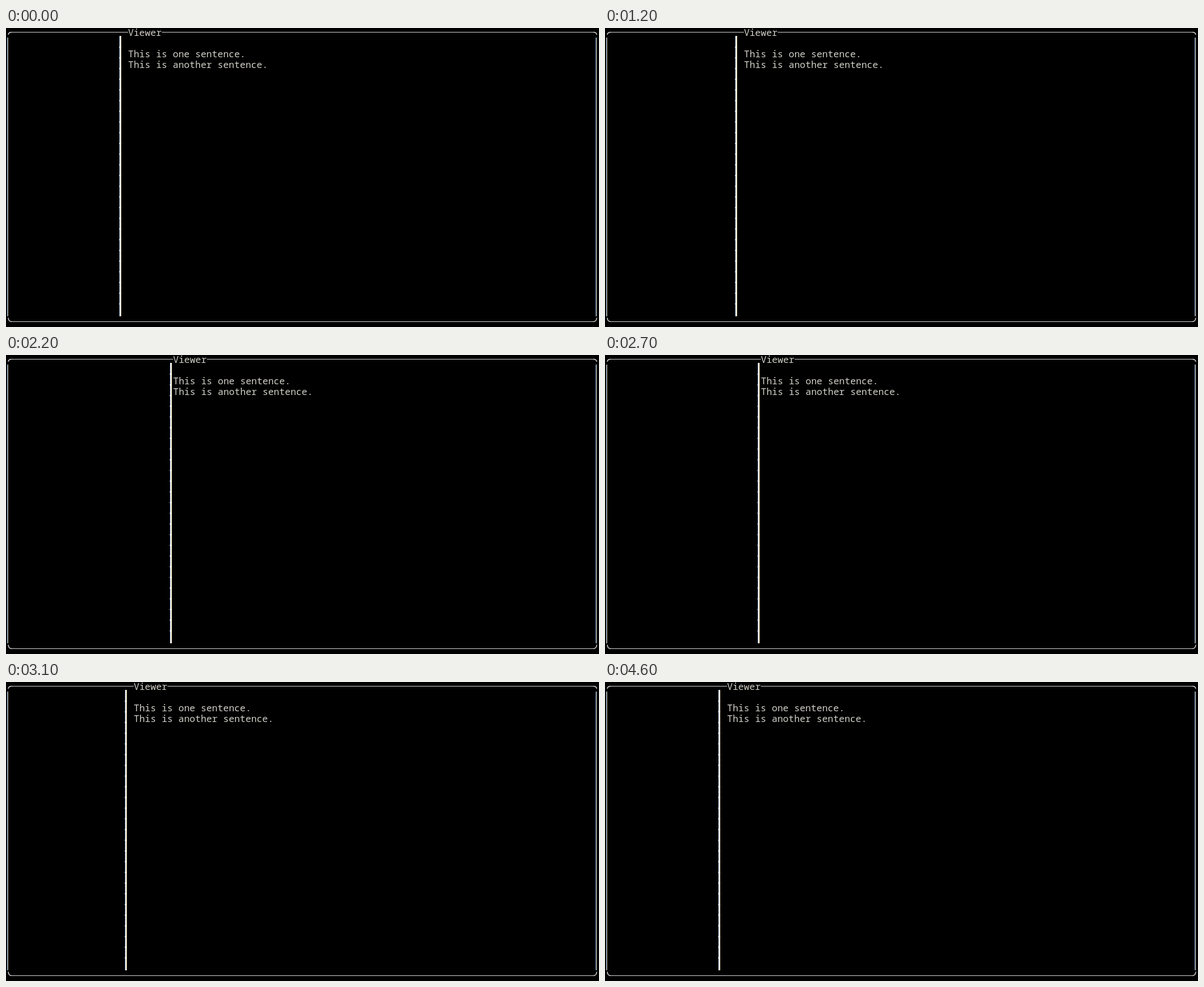
Animation, 1054 px wide and 531 px high, one loop 6100 ms. Source, as an HTML page:

```html
<!DOCTYPE html>
<html lang="en">
<head>
<meta charset="utf-8">
<title>Split pane</title>
<style>
html, body { margin: 0; width: 100%; height: 100%; overflow: hidden; background: #000; }
svg { display: block; }
text { font: 16.57px "Noto Sans Mono", monospace; fill: #d2cfc8; white-space: pre; }
path { fill: none; stroke: #d4d4d4; }
.corner { stroke-width: 1.5; }
.cool { stroke: #6f9fd8; }
.warm { stroke: #c9b48c; }
.core { stroke: #fffdf6; stroke-width: 2; }
.joint { stroke: #d8d4cc; stroke-width: 4; stroke-dasharray: 2 17; }
</style>
</head>
<body>
<svg width="1054" height="531" viewBox="0 0 1054 531">
  <path d="M9 7.5H1046M9 521.5H1046"/>
  <path class="corner" d="M4 12Q4.5 7.5 10 7.5M1050 12Q1049.5 7.5 1044 7.5M4 514.5Q4.5 521.5 10 521.5M1050 514.5Q1049.5 521.5 1044 521.5"/>
  <path class="cool" d="M2.5 17V512M1048.5 17V512"/>
  <path class="warm" d="M3.5 17V512M1049.5 17V512"/>
  <g id="bar">
    <path class="cool" d="M.5 14V512" opacity=".5"/>
    <path class="warm" d="M3.5 14V512"/>
    <path class="joint" d="M2 33V495"/>
    <path class="core" d="M2 14V512"/>
  </g>
  <g id="pane">
    <rect width="60" height="16"/>
    <text y="14">Viewer</text>
    <text y="52">This is one sentence.</text>
    <text y="71">This is another sentence.</text>
  </g>
</svg>
<script>
const LOOP = 6100, TICK = 100, CELL = 10, HOME = 21;
// Each drag runs evenly between two columns, then rests.
const drags = [
  { start: 700, end: 900, from: 22, to: 23 },
  { start: 1200, end: 1500, from: 24, to: 26 },
  { start: 2000, end: 2100, from: 28, to: 30 },
  { start: 2200, end: 2200, from: 29, to: 29 },
  { start: 2700, end: 3100, from: 27, to: 22 },
  { start: 3300, end: 3400, from: 21, to: 20 },
  { start: 4600, end: 4600, from: HOME, to: HOME }
];
const bar = document.getElementById("bar");
const pane = document.getElementById("pane");
const moveTo = (el, x) => el.setAttribute("transform", `translate(${x})`);

function columnAt(t) {
  const drag = drags.findLast(d => d.start <= t);
  if (!drag) return HOME;
  const { start, end, from, to } = drag;
  if (t >= end) return to;
  return Math.ceil(from + (to - from) * (t - start) / (end - start) - 0.5);
}

function draw(now) {
  const t = Math.floor(now % LOOP / TICK) * TICK;
  const col = columnAt(t);
  const x = 7 + col * CELL;
  // Past column 25 the divider sits right beside the text.
  moveTo(bar, x - (col > 25 ? 6 : 16));
  moveTo(pane, x);
}

const origin = performance.now();
function tick() {
  draw(performance.now() - origin);
  requestAnimationFrame(tick);
}
tick();
</script>
</body>
</html>
```
